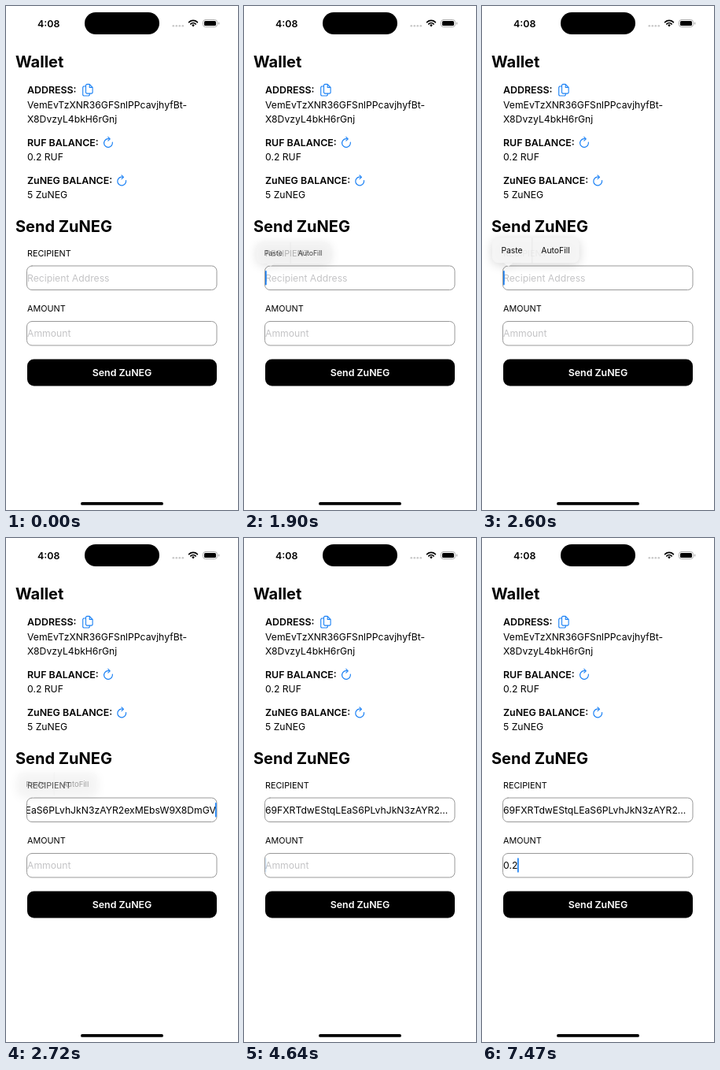
Write an HTML page with a canvas that moves like this. It is 295 px wide and 640 px high and loops after 8000 ms.

```html
<!DOCTYPE html>
<html lang="en">
<head>
<meta charset="utf-8">
<title>Wallet</title>
<style>
  html, body { margin: 0; width: 100%; height: 100%; overflow: hidden; background: #fff; }
  canvas { display: block; width: 295px; height: 640px; }
</style>
</head>
<body>
<canvas id="stage"></canvas>
<script>
const W = 295, H = 640, LOOP = 8000;
const BLUE = '#1c82f5', GRAY = '#c4c4c6';
const TOKEN = 'ZuNEG', COIN = 'RUF';
const HEAD = '69FXRTdwEStqL', TAIL = 'EaS6PLvhJkN3zAYR2exMEbsW9X8DmGV';
const BODY = '400 12.2px', LABEL = '600 12.4px', SMALL = '400 10.8px', TITLE = '700 20px';
const LEFT = 27, RIGHT = 268;

const canvas = document.getElementById('stage');
const ctx = canvas.getContext('2d');
const dpr = window.devicePixelRatio || 1;
canvas.width = W * dpr;
canvas.height = H * dpr;

// Stepped tracks: [start time, value...]
const CARET = [[0, 0], [1110, 1], [2370, 0], [2480, .5], [2600, 1], [3320, 0], [3610, .5],
  [3710, 1], [4640, .15], [4760, 1], [5940, .15], [6170, 1]];
const MENU = [[0, 1, 0], [1900, .81, .72], [2010, .95, .95], [2120, 1, 1], [2600, .96, .95],
  [2720, .88, .35], [2830, 1, 0]];
const AMOUNT = [[0, ''], [5310, '0'], [6670, '0.'], [7470, '0.2']];
const PASTED = 2720, SWITCHED = 4120;

const at = (track, t) => track.filter(key => key[0] <= t).pop().slice(1);

function text(str, x, y, font = BODY, color = '#000', align = 'left') {
  ctx.font = font + ' Inter, sans-serif';
  ctx.fillStyle = color;
  ctx.textAlign = align;
  ctx.fillText(str, x, y);
}

function box(x, y, w, h, r, fill, stroke) {
  ctx.beginPath();
  ctx.roundRect(x, y, w, h, r);
  if (fill) { ctx.fillStyle = fill; ctx.fill(); }
  if (stroke) { ctx.strokeStyle = stroke; ctx.lineWidth = 1; ctx.stroke(); }
}

function line(points, color, width) {
  ctx.beginPath();
  points.forEach(([x, y]) => ctx.lineTo(x, y));
  ctx.strokeStyle = color;
  ctx.lineWidth = width;
  ctx.stroke();
}

function statusBar() {
  text('4:08', 40, 26.5, LABEL);
  box(100, 8, 95, 28, 14, '#000');
  for (let i = 0; i < 4; i++) box(211.5 + i * 4, 24, 2.6, 2.6, 1.3, '#c8c8c8');
  ctx.strokeStyle = '#000';
  ctx.lineWidth = 1.7;
  for (const r of [4.5, 7.6]) {
    ctx.beginPath();
    ctx.arc(238, 26, r, -Math.PI * .75, -Math.PI * .25);
    ctx.stroke();
  }
  ctx.fillStyle = '#000';
  ctx.beginPath();
  ctx.moveTo(238, 26.5);
  ctx.arc(238, 26, 2.5, -Math.PI * .75, -Math.PI * .25);
  ctx.fill();
  box(250.5, 17.5, 18, 9, 3, null, '#aaa');
  box(252, 19, 15, 6, 1.6, '#000');
  box(270, 20.5, 1.2, 3, .6, '#aaa');
}

function copyIcon() {
  line([[101.3, 102], [98.8, 102], [97.7, 103.1], [97.7, 113], [98.8, 114], [105.2, 114],
    [106.3, 113], [106.3, 111.2]], BLUE, 1.1);
  line([[106.2, 99.4], [102.6, 99.4], [101.5, 100.5], [101.5, 110], [102.6, 111.1], [109, 111.1],
    [110.1, 110], [110.1, 103.4], [106.2, 99.4], [106.2, 103.4], [110.1, 103.4]], BLUE, 1.1);
}

function refreshIcon(x, y) {
  ctx.beginPath();
  ctx.arc(x, y, 5.4, -.15, Math.PI * 1.58);
  ctx.strokeStyle = BLUE;
  ctx.lineWidth = 1.2;
  ctx.stroke();
  line([[x - .2, y - 7.6], [x + 2.3, y - 5.2], [x - .2, y - 2.8]], BLUE, 1.1);
}

function screen() {
  text('Wallet', 12, 78, TITLE);
  text('ADDRESS:', LEFT, 111, LABEL);
  copyIcon();
  text('VemEvTzXNR36GFSnlPPcavjhyfBt-', LEFT, 129.5);
  text('X8DvzyL4bkH6rGnj', LEFT, 147.5);
  text(COIN + ' BALANCE:', LEFT, 177.5, LABEL);
  refreshIcon(130, 174);
  text('0.2 ' + COIN, LEFT, 195.5);
  text(TOKEN + ' BALANCE:', LEFT, 226, LABEL);
  refreshIcon(147.2, 222.5);
  text('5 ' + TOKEN, LEFT, 244.3);
  text('Send ' + TOKEN, 12, 286.7, TITLE);
  text('RECIPIENT', LEFT, 318, SMALL);
  text('AMOUNT', LEFT, 388.3, SMALL);
  box(26.5, 330, 241.5, 30.5, 6.5, null, '#999');
  box(26.5, 400.5, 241.5, 30.5, 6.5, null, '#999');
  box(LEFT, 448.5, 241, 34, 8.5, '#000');
  text('Send ' + TOKEN, 147.5, 470, LABEL, '#fff', 'center');
  box(95, 630, 105, 3.8, 1.9, '#000');
}

function fields(t) {
  const amount = at(AMOUNT, t)[0];
  let caretX = LEFT, caretY = 336;

  ctx.save();
  ctx.beginPath();
  ctx.rect(26.5, 331, 241, 29);
  ctx.clip();
  if (t < PASTED) {
    text('Recipient Address', LEFT, 349.5, BODY, GRAY);
  } else if (t < SWITCHED) {
    text(HEAD + TAIL, RIGHT - 1, 349.5, BODY, '#000', 'right');
    caretX = RIGHT - 2;
  } else {
    text(HEAD + TAIL.slice(0, 17) + '...', LEFT, 349.5);
  }
  ctx.restore();

  text(amount || 'Ammount', LEFT, 420, BODY, amount ? '#000' : GRAY);
  if (t >= SWITCHED) {
    caretY = 406.3;
    if (amount) caretX = LEFT + ctx.measureText(amount).width - .3;
  }
  ctx.globalAlpha = at(CARET, t)[0];
  box(caretX, caretY, 1.7, 18.5, .8, BLUE);
  ctx.globalAlpha = 1;
}

function menu(t) {
  const [scale, alpha] = at(MENU, t);
  if (!alpha) return;
  const tipX = 33.5, tipY = 331;
  ctx.save();
  ctx.translate(tipX, tipY);
  ctx.scale(scale, scale);
  ctx.translate(-tipX, -tipY);
  ctx.globalAlpha = alpha;
  ctx.shadowColor = 'rgba(0,0,0,.17)';
  ctx.shadowBlur = 13 * dpr;
  ctx.shadowOffsetY = 2 * dpr;
  ctx.fillStyle = '#f6f6f6';
  ctx.beginPath();
  ctx.roundRect(12, 293, 115.5, 33, 8);
  ctx.moveTo(27, 325.9);
  ctx.lineTo(tipX, tipY);
  ctx.lineTo(40, 325.9);
  ctx.fill();
  ctx.shadowColor = 'transparent';
  line([[65, 293], [65, 326]], '#e2e2e2', .8);
  text('Paste', 24, 313.8, SMALL);
  text('AutoFill', 77, 313.8, SMALL);
  ctx.restore();
}

function draw(now) {
  const t = now % LOOP;
  ctx.setTransform(dpr, 0, 0, dpr, 0, 0);
  ctx.lineJoin = ctx.lineCap = 'round';
  ctx.fillStyle = '#fff';
  ctx.fillRect(0, 0, W, H);
  statusBar();
  screen();
  fields(t);
  menu(t);
  requestAnimationFrame(draw);
}
requestAnimationFrame(draw);
</script>
</body>
</html>
```
